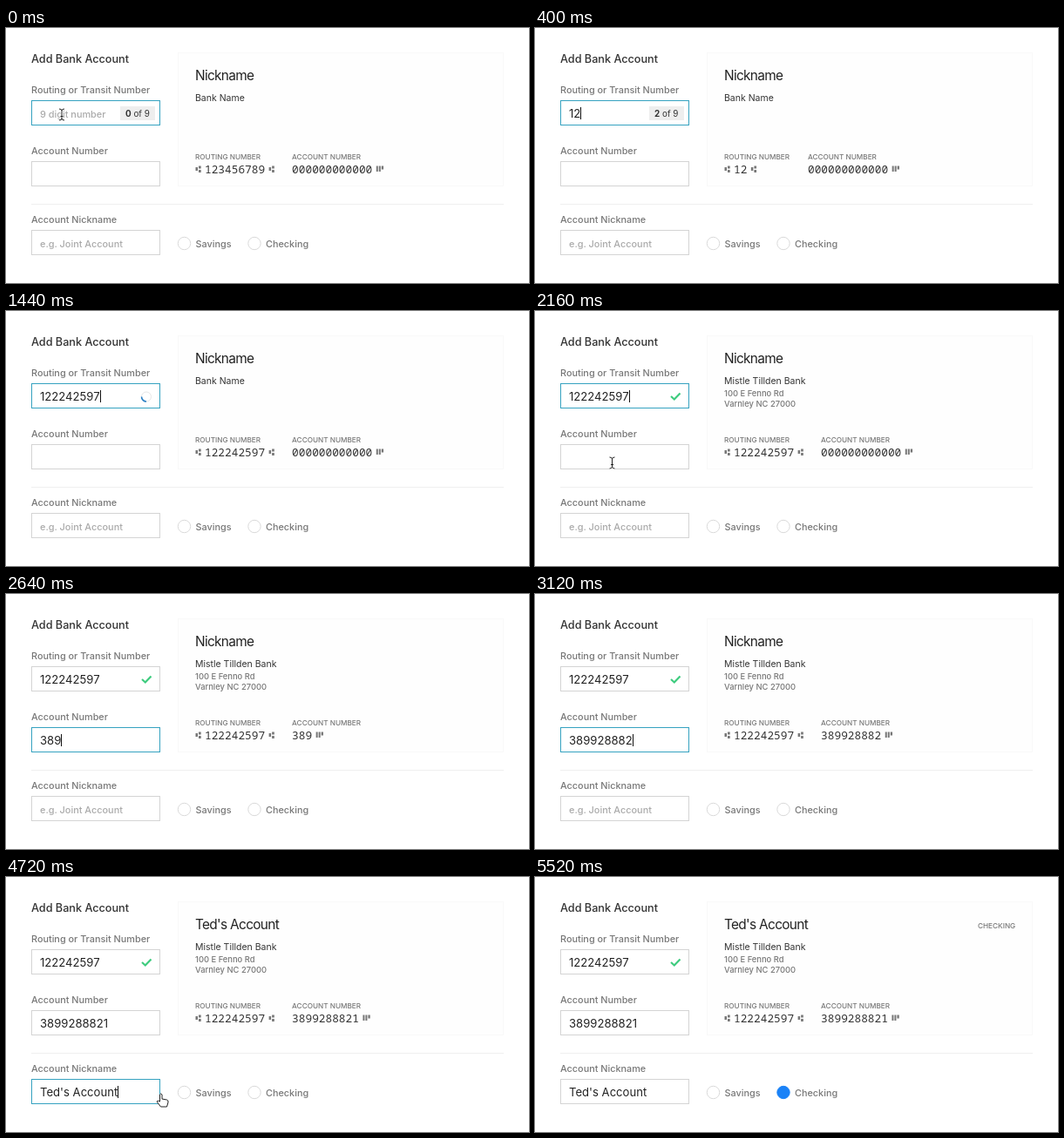
Write an HTML page that moves like this. It is 600 px wide and 293 px high and loops after 7.52 s.

```html
<!DOCTYPE html>
<html lang="en">
<head>
<meta charset="utf-8">
<title>Add Bank Account</title>
<style>
  html, body { margin: 0; width: 100%; height: 100%; overflow: hidden; background: #fff; }
  svg { display: block; width: 600px; height: 293px; font: 13.1px Inter, "Open Sans", sans-serif; }
  text { white-space: pre; fill: #333; }
  .title { font-size: 12.65px; font-weight: 500; }
  .label { font-size: 10.85px; font-weight: 500; fill: #777; }
  .hint { font-size: 10.9px; font-weight: 500; fill: #aaa; }
  .value { fill: #222; }
  .name { font-size: 15.4px; letter-spacing: -.68px; fill: #222; }
  .bank { font-size: 10.5px; }
  .address { font-size: 9.4px; font-weight: 500; fill: #777; }
  .caps { font-size: 8.2px; font-weight: 500; fill: #777; }
  .digits { font: 500 12.8px "Noto Sans Mono", monospace; }
  .count { font-size: 9.9px; }
  .count tspan { font-weight: 700; }
  .box { fill: #fff; stroke: #d4d4d4; }
  .focus .box { stroke: #35a2c0; }
  .radio { fill: #fff; stroke: #dadada; }
  .on { fill: #1a82f7; stroke: #1a82f7; }
</style>
</head>
<body>
<svg viewBox="0 0 600 293">
  <defs>
    <path id="transit" fill="#777" d="M.5 160h2.5v4h-2.5z M4 158.5h2.7v3h-2.7z M4 163h2.7v3h-2.7z"/>
    <path id="onus" fill="#777" d="M0 158.5h2v6.5h-2z M3 158.5h2v6.5h-2z M6 158.5h2.3v4h-2.3z"/>
    <path id="ibeam" d="M-3-6.5Q0-6.5 0-4.5Q0-6.5 3-6.5M0-4.5V4.5M-3 6.5Q0 6.5 0 4.5Q0 6.5 3 6.5M-1.5 2H1.5"/>
  </defs>

  <rect x="197.5" y="28.5" width="373" height="153" fill="#fefefe" stroke="#f9f9f9"/>
  <path d="M29 202.5H571" stroke="#efefef"/>
  <text class="title" x="29" y="40">Add Bank Account</text>
  <g id="fields"></g>

  <g id="badge">
    <rect x="131" y="90" width="40" height="16" fill="#eee"/>
    <text class="count" x="137" y="101.5"><tspan id="count">0</tspan> of 9</text>
  </g>
  <g id="spinner" fill="none" stroke-width="1.6">
    <circle cx="161" cy="98.5" r="5.5" stroke="#e6e6e6" stroke-width="1"/>
    <path id="arc" d="M161 104A5.5 5.5 0 0 1 155.5 98.5" stroke="#2a7fc4"/>
  </g>
  <path id="tick" d="M156 98L159.8 101.5L166.500 94.5" fill="none" stroke="#3fcc7f" stroke-width="2.2"/>

  <circle class="radio" cx="204.5" cy="247.5" r="7.2"/>
  <text class="label" x="217.5" y="251.5">Savings</text>
  <circle class="radio" id="checking" cx="285" cy="247.5" r="7.2"/>
  <text class="label" x="298" y="251.5">Checking</text>

  <text class="name" id="name" x="217" y="60"></text>
  <text class="bank" id="bank" x="217" y="84"></text>
  <g id="address">
    <text class="address" x="217" y="98">100 E Fenno Rd</text>
    <text class="address" x="217" y="110">Varnley NC 27000</text>
  </g>
  <text class="caps" id="type" x="508" y="59">CHECKING</text>

  <text class="caps" x="217" y="150.5">ROUTING NUMBER</text>
  <use href="#transit" x="217"/>
  <text class="digits" id="routing" x="228" y="166.5"></text>
  <use href="#transit" id="routingEnd"/>
  <g id="account">
    <text class="caps" y="150.5">ACCOUNT NUMBER</text>
    <text class="digits" id="accountNo" y="166.5"></text>
    <use href="#onus" id="accountEnd"/>
  </g>

  <g id="beam" fill="none">
    <use href="#ibeam" stroke="#fff" stroke-width="2.5"/>
    <use href="#ibeam" stroke="#222"/>
  </g>
  <path id="hand" fill="#fff" stroke="#222" stroke-linejoin="round"
    d="M-1 9V1Q0-1 1.5 1V6L7 7Q9 7.5 8.5 10L7 15H0L-4.5 9Q-3.5 7-1 9z"/>
</svg>

<script>
const STEP = 80, LOOP = 7520, LAST = 69, ADVANCE = 7.68;
const ROUTING = '122242597', ACCOUNT = '3899288821', NICKNAME = "Ted's Account";
const $ = id => document.getElementById(id);
const clamp = (v, lo, hi) => Math.max(lo, Math.min(hi, v));
const show = (id, on) => $(id).setAttribute('visibility', on ? 'visible' : 'hidden');
const place = (id, x, y = 0) => $(id).setAttribute('transform', `translate(${x} ${y})`);

function makeField(y, label, hint) {
  const g = document.createElementNS('http://www.w3.org/2000/svg', 'g');
  g.innerHTML = `<text class="label" x="29" y="${y - 8}">${label}</text>
    <rect class="box" x="29.5" y="${y + .5}" width="147" height="28"/>
    <text class="hint" x="39" y="${y + 19.5}">${hint}</text>
    <text class="value" x="39" y="${y + 20}"></text>
    <path class="caret" stroke="#111"/>`;
  $('fields').append(g);
  const [hintEl, value, caret] = ['.hint', '.value', '.caret'].map(s => g.querySelector(s));
  return (text, focused) => {
    g.setAttribute('class', focused ? 'focus' : '');
    hintEl.setAttribute('visibility', text ? 'hidden' : 'visible');
    value.textContent = text;
    const x = text ? Math.round(39 + value.getComputedTextLength()) + .5 : 0;
    caret.setAttribute('d', focused && text ? `M${x} ${y + 8}v14` : '');
  };
}

const fields = [
  makeField(83, 'Routing or Transit Number', '9 digit number'),
  makeField(153, 'Account Number', ''),
  makeField(232, 'Account Nickname', 'e.g. Joint Account')
];

// Pointer moves: first step, last step, start and end point
const moves = [
  [23, 27, 64, 99.5, 88.5, 174.5],
  [41, 43, 88.5, 174.5, 70, 247],
  [58, 60, 70, 247, 285, 251]
];

function pointer(k) {
  let pos = [64, 99.5];
  for (const [from, to, x0, y0, x1, y1] of moves) {
    if (k < from) break;
    const u = clamp((k - from) / (to - from), 0, 1), e = u * u * (3 - 2 * u);
    pos = [x0 + (x1 - x0) * e, y0 + (y1 - y0) * e];
  }
  return pos;
}

function draw(k) {
  const typed = (text, start) => text.slice(0, clamp(k - start, 0, text.length));
  const routing = typed(ROUTING, 3), account = typed(ACCOUNT, 30), nick = typed(NICKNAME, 44);
  const found = k >= 21, loading = k >= 13 && !found, picked = k >= 60;

  fields[0](routing, k < 28);
  fields[1](account, k >= 28 && k < 43);
  fields[2](nick, k >= 43 && !picked);

  $('count').textContent = routing.length;
  show('badge', k < 13);
  show('spinner', loading);
  $('arc').setAttribute('transform', `rotate(${(k - 18) * 36} 161 98.5)`);
  show('tick', found);

  $('name').textContent = nick || 'Nickname';
  $('bank').textContent = found ? 'Mistle Tillden Bank' : 'Bank Name';
  show('address', found);
  $('checking').setAttribute('class', picked ? 'radio on' : 'radio');
  $('type').setAttribute('opacity', clamp((k - 59) / 4, 0, 1));

  const routingNo = routing || '123456789', accountNo = account || '0'.repeat(12);
  const end = 228 + routingNo.length * ADVANCE;
  $('routing').textContent = routingNo;
  place('routingEnd', end + 4);
  place('account', Math.max(313, end + 31));
  $('accountNo').textContent = accountNo;
  place('accountEnd', accountNo.length * ADVANCE + 4.5);

  const pos = pointer(k);
  show('beam', k < 4 || k >= 23 && k < 31 || k >= 41 && k < 45 || k === 58);
  show('hand', k >= 59 && k < 66);
  place('beam', ...pos);
  place('hand', ...pos);
}

let shown = -1;
function tick() {
  const k = Math.min(LAST, Math.floor(performance.now() % LOOP / STEP));
  if (k !== shown) draw(shown = k);
  requestAnimationFrame(tick);
}
tick();
</script>
</body>
</html>
```
